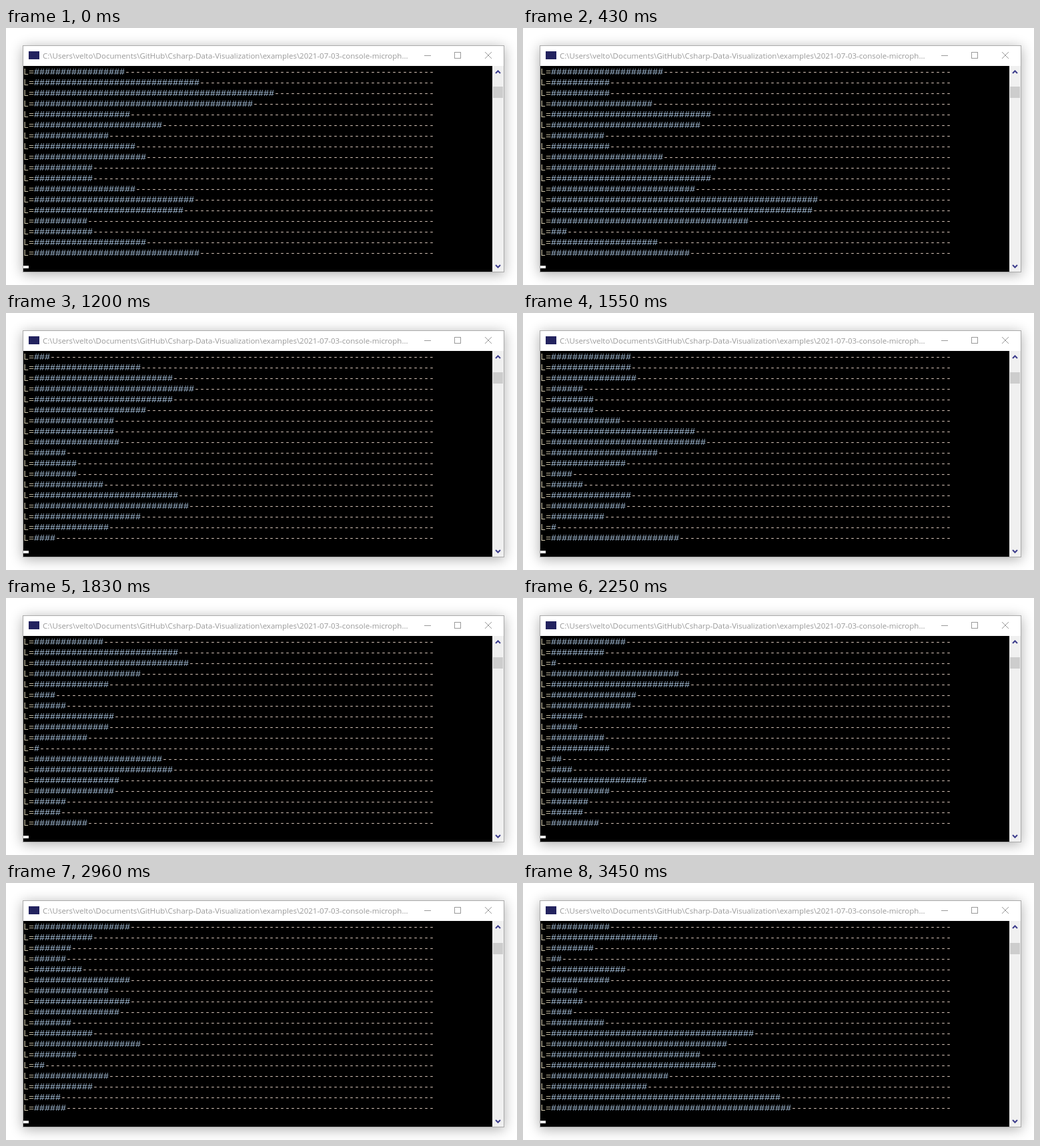
Write an HTML page with a canvas that moves like this. It is 766 by 386 pixels and loops after 3.52 s.

```html
<!DOCTYPE html>
<html lang="en">
<head>
<meta charset="utf-8">
<title>Console level meter</title>
<style>
html, body { margin: 0; width: 766px; height: 386px; overflow: hidden; background: #fff; }
canvas { display: block; }
</style>
</head>
<body>
<canvas id="stage" width="766" height="386"></canvas>
<script>
const ctx = document.getElementById('stage').getContext('2d');
const LOOP = 3520, ROWS = 18, COLS = 75;
const title = 'C:\\Users\\velto\\Documents\\GitHub\\Csharp-Data-Visualization\\examples\\2021-07-03-console-microph...';

// Loudness of each printed line, oldest first
const levels = [
  17, 31, 45, 41, 18, 24, 14, 19, 21, 11, 11, 19, 30, 28, 10,
  11, 21, 31, 30, 27, 50, 49, 37, 3, 20, 26, 30, 26, 21, 15, 15, 16, 6,
  8, 8, 13, 27, 29, 20, 14, 4, 6, 15, 14, 10, 1, 24, 26, 16, 15, 6, 5, 10,
  11, 2, 4, 18, 11, 7, 6, 9, 18, 14, 18, 16, 7, 11, 20, 8, 2, 14, 11, 5, 6,
  4, 10, 38, 33, 28, 31, 22, 18, 43, 45
];

function rect(color, x, y, w, h) {
  ctx.fillStyle = color;
  ctx.fillRect(x, y, w, h);
}

function text(str, color, x, y) {
  ctx.fillStyle = color;
  ctx.fillText(str, x, y);
}

function line(color, width, ...points) {
  ctx.strokeStyle = color;
  ctx.lineWidth = width;
  ctx.beginPath();
  for (const [x, y] of points) ctx.lineTo(x, y);
  ctx.stroke();
}

function drawWindow() {
  rect('#fff', 0, 0, 766, 386);
  ctx.save();
  ctx.shadowColor = 'rgba(0, 0, 0, .32)';
  ctx.shadowBlur = 18;
  ctx.shadowOffsetY = 3;
  rect('#aaa', 25, 26, 722, 341);
  ctx.restore();
  rect('#fff', 26, 27, 720, 30);
  rect('#23235f', 34, 35, 16, 12);
  ctx.font = '11.5px "Open Sans", "Noto Sans", sans-serif';
  text(title, '#999', 55, 46);

  const grey = '#999';
  rect(grey, 627, 41, 10, 1);
  ctx.strokeStyle = grey;
  ctx.lineWidth = 1;
  ctx.strokeRect(672.5, 36.5, 9, 9);
  line(grey, 1, [718, 36], [728, 46]);
  line(grey, 1, [728, 36], [718, 46]);
}

function drawScrollbar(scroll) {
  const navy = '#3c3c8c';
  rect('#f0f0f0', 729, 57, 17, 309);
  line(navy, 2, [734, 68], [737.5, 64.5], [741, 68]);
  line(navy, 2, [734, 356], [737.5, 359.5], [741, 356]);
  rect('#cdcdcd', 730, 88 + Math.floor((scroll + 22) / 35), 15, 17);
}

function drawConsole(scroll) {
  rect('#000', 26, 57, 703, 309);
  ctx.font = '13.333px "Liberation Mono", "DejaVu Sans Mono", monospace';
  for (let row = 0; row < ROWS; row++) {
    const n = levels[scroll + row], y = 70 + 16 * row;
    text('L=', '#ccc4a8', 26, y);
    text('#'.repeat(n), '#b4d0ec', 42, y);
    text('-'.repeat(COLS - n), '#dcc8bc', 42 + 8 * n, y);
  }
  rect('#f2f2f2', 26, 357, 8, 4);
}

function draw(now) {
  const t = now % LOOP;
  const step = Math.max(0, Math.floor((t - (t < 2600 ? 10 : 20)) / 70));
  const scroll = Math.floor(1.3428 * step + 0.33);
  drawWindow();
  drawConsole(scroll);
  drawScrollbar(scroll);
}

const start = performance.now();
function tick() {
  draw(performance.now() - start);
  requestAnimationFrame(tick);
}
tick();
</script>
</body>
</html>
```
